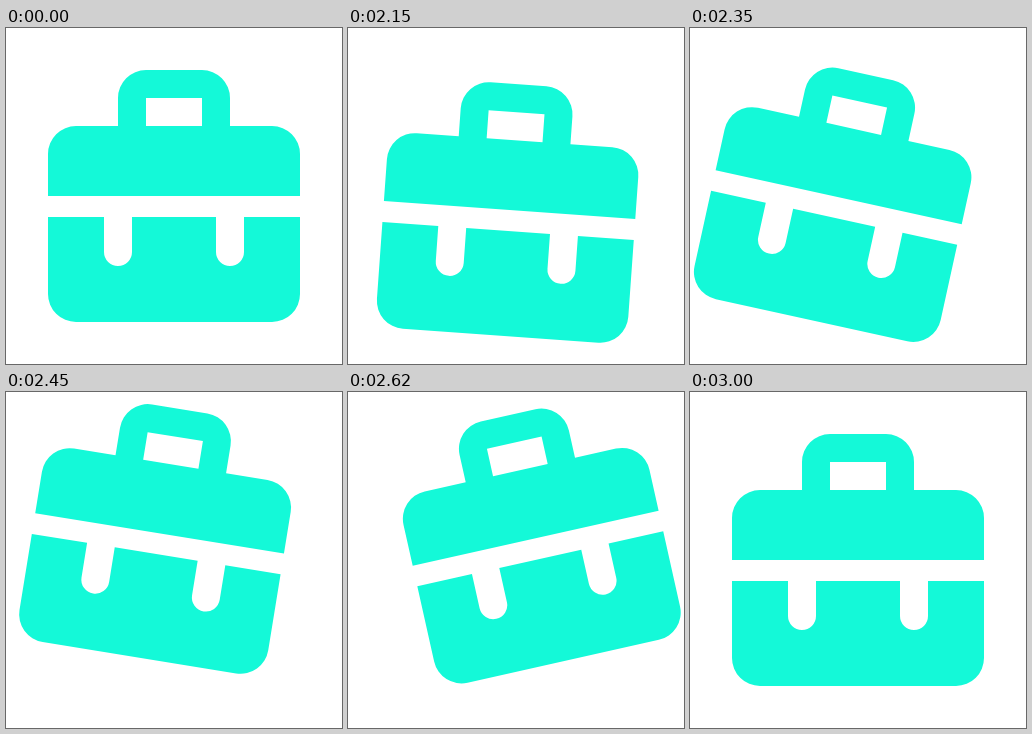
An HTML page with a canvas that plays this animation: 336 px wide and 336 px high, repeating every 3.02 s.

```html
<!DOCTYPE html>
<html lang="en">
<head>
<meta charset="utf-8">
<title>Briefcase</title>
<style>
  html, body { margin: 0; width: 100%; height: 100%; overflow: hidden; background: #fff; }
  canvas { display: block; width: 336px; height: 336px; }
</style>
</head>
<body>
<canvas id="stage" width="336" height="336"></canvas>
<script>
const ctx = document.getElementById('stage').getContext('2d');
const SIZE = 336, LOOP = 3020, STEP = 25, REST = 2000;
const COLOR = '#14f9d8';
const PIVOT = { x: 168, y: 78 };

// [time in ms after the rest, value]
const TILT = [[0, 0], [402, 13], [604, -13.5], [785, 10], [1000, 0]];
const LIFT = [[0, 0], [250, 22], [500, -31], [537, -31], [750, 0]];

const ease = x => x * x * (3 - 2 * x);

function valueAt(keys, t) {
  if (t <= keys[0][0]) return keys[0][1];
  for (let i = 1; i < keys.length; i++) {
    const [t0, a] = keys[i - 1], [t1, b] = keys[i];
    if (t < t1) return a + (b - a) * ease((t - t0) / (t1 - t0));
  }
  return keys[keys.length - 1][1];
}

function makeCase() {
  const p = new Path2D();
  // handle and lid, one outline
  p.moveTo(42, 168);
  p.lineTo(42, 126);
  p.arcTo(42, 98, 70, 98, 28);
  p.lineTo(112, 98);
  p.lineTo(112, 70);
  p.arcTo(112, 42, 140, 42, 28);
  p.lineTo(196, 42);
  p.arcTo(224, 42, 224, 70, 28);
  p.lineTo(224, 98);
  p.lineTo(266, 98);
  p.arcTo(294, 98, 294, 126, 28);
  p.lineTo(294, 168);
  p.closePath();
  p.rect(140, 70, 56, 28);
  // lower half with two strap notches
  p.moveTo(42, 189);
  for (const x of [98, 210]) {
    p.lineTo(x, 189);
    p.lineTo(x, 224);
    p.arc(x + 14, 224, 14, Math.PI, 0, true);
    p.lineTo(x + 28, 189);
  }
  p.lineTo(294, 189);
  p.lineTo(294, 266);
  p.arcTo(294, 294, 266, 294, 28);
  p.lineTo(70, 294);
  p.arcTo(42, 294, 42, 266, 28);
  p.closePath();
  return p;
}

const briefcase = makeCase();

function draw(now) {
  const t = now % LOOP;
  const tick = Math.floor((t + 5) / STEP) * STEP - REST;
  ctx.fillStyle = '#fff';
  ctx.fillRect(0, 0, SIZE, SIZE);
  ctx.save();
  ctx.translate(PIVOT.x, PIVOT.y + valueAt(LIFT, tick));
  ctx.rotate(valueAt(TILT, tick) * Math.PI / 180);
  ctx.translate(-PIVOT.x, -PIVOT.y);
  ctx.fillStyle = COLOR;
  ctx.fill(briefcase, 'evenodd');
  ctx.restore();
}

let start = null;
function frame() {
  const now = performance.now();
  if (start === null) start = now;
  draw(now - start);
  requestAnimationFrame(frame);
}
draw(0);
requestAnimationFrame(frame);
</script>
</body>
</html>
```
